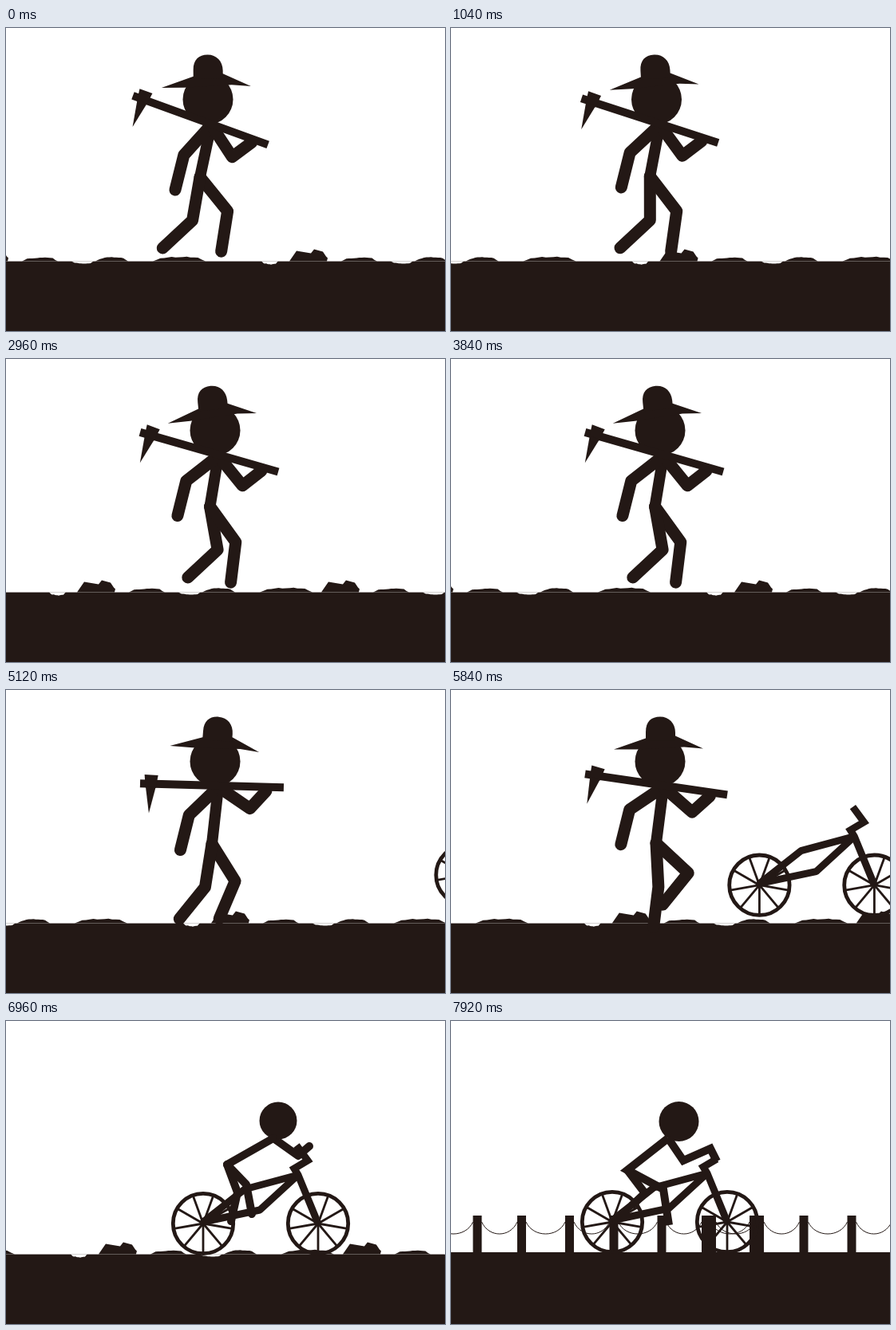
Recreate the animation shown at these times as an HTML page with a canvas. Size 550 by 380 pixels, loop 8000 ms.

```html
<!DOCTYPE html>
<html lang="en">
<head>
<meta charset="utf-8">
<title>Walker and rider</title>
<style>
html, body { margin: 0; width: 100%; height: 100%; overflow: hidden; background: #fff; }
canvas { display: block; width: 550px; height: 380px; }
</style>
</head>
<body>
<canvas id="stage" width="550" height="380"></canvas>
<script>
const ctx = document.getElementById('stage').getContext('2d');
const INK = '#231815';
const STEP = 80, FRAMES = 100;
const RESET = 48, MOUNT = 80, FENCE = 94;

const mix = (a, b, k) => a + (b - a) * k;
const mixAll = (a, b, k) => a.map((v, i) => mix(v, b[i], k));
const rad = deg => deg * Math.PI / 180;
const mod = (a, n) => (a % n + n) % n;
const noise = n => mod(Math.sin(n * 127.1 + 3) * 4375.5, 1);

function trace(pts) {
  ctx.beginPath();
  for (let i = 0; i < pts.length; i += 2) ctx.lineTo(pts[i], pts[i + 1]);
}
function shape(pts, color = INK) {
  trace(pts);
  ctx.fillStyle = color;
  ctx.fill();
}
function limb(pts, width, join = 'round') {
  trace(pts);
  ctx.lineWidth = width;
  ctx.lineJoin = join;
  ctx.lineCap = join === 'round' ? 'round' : 'butt';
  ctx.strokeStyle = INK;
  ctx.stroke();
}
function disc(x, y, r) {
  ctx.beginPath();
  ctx.arc(x, y, r, 0, 7);
  ctx.fillStyle = INK;
  ctx.fill();
}
function box(x, y, w, h, color = INK) {
  ctx.fillStyle = color;
  ctx.fillRect(x, y, w, h);
}
function placed(x, y, deg, draw) {
  ctx.save();
  ctx.translate(x, y);
  ctx.rotate(rad(deg));
  draw();
  ctx.restore();
}

// ---- Terrain: one tile of lumps (x, width, height), repeated ----
const TILES = [-400, 0, 306];
const LUMPS = [[65, 45, 5], [127, 28, -3], [157, 41, 5.5], [229, 66, 6]];

function lump(x, w, h) {
  const pts = [x, 0];
  for (let i = 1; i < 14; i++) {
    const t = i / 14;
    const edge = Math.min(1, 7 * t, 7 * (1 - t));
    const rise = .5 + .45 * Math.sin(Math.PI * t ** 1.3) + .2 * (noise(i + w) - .5);
    pts.push(x + w * t, -h * edge * rise);
  }
  shape([...pts, x + w, 0], h < 0 ? '#fff' : INK);
}
function rock() {
  shape([0, 0, 9, -13, 27, -10, 31, -15, 42, -12, 46, -6, 48, -4, 47, 0]);
}
function terrain(f) {
  const x = f < RESET ? 355 - 7.19 * f : 355 - 6.13 * (f - RESET);
  box(0, 292.6, 550, 88);
  placed(x, 292.6, 0, () => lump(-35, 21, -4));
  for (const tile of TILES) placed(x + tile, 292.6, 0, () => {
    rock();
    LUMPS.forEach(l => lump(...l));
  });
}

// ---- Walker ----
const STRIDE = 11;                    // frames per step
const KNOTS = [0, .18, .545, .818];   // landing, lift, swing, passing

// Value at step phase u, from four key values per step
function key(values, u) {
  const n = values.length / 4;
  u = mod(u, n);
  const at = i => KNOTS[i % 4] + (i >> 2);
  let i = values.length - 1;
  while (at(i) > u) i--;
  return mix(values[i], values[(i + 1) % values.length], (u - at(i)) / (at(i + 1) - at(i)));
}
// Point at a distance; angle counts from straight down, forwards positive
const reach = ([x, y], len, deg) => [x + len * Math.sin(rad(deg)), y + len * Math.cos(rad(deg))];

function chainOf(start, len1, deg1, len2, deg2) {
  const mid = reach(start, len1, deg1);
  return [...start, ...mid, ...reach(mid, len2, deg2)];
}
// Joint between two points, bent downwards
function elbow([ax, ay], [bx, by], l1, l2) {
  const d = Math.min(Math.hypot(bx - ax, by - ay), l1 + l2);
  const bend = Math.acos((l1 * l1 + d * d - l2 * l2) / (2 * l1 * d));
  const a = Math.atan2(by - ay, bx - ax) + bend;
  return [ax + l1 * Math.cos(a), ay + l1 * Math.sin(a)];
}

function hat() {
  shape([-58, -15, -18, -29, 19, -32, 54, -16, 30, -18, -30, -15]);
  ctx.fill(new Path2D('M-18-26V-37C-18-50-11-56 0-56S19-48 19-36V-26Z'));
}
function pick(tilt) {
  box(0, -5, 180, 10);
  placed(13, 0, Math.min(20, 2 * tilt) - tilt, () => {
    shape([-8, -11, 9, -11, 7, 5, -6, 5]);
    shape([-6, 3, 7, 3, 0, 37]);
  });
}
function walker(f) {
  const u = (f - 64) / STRIDE;
  const neck = [266, 121.5];
  const hip = [key([258, 252, 255.5, 257], u), key([193, 187, 185, 192], u)];
  const tilt = key([1.6, 20, 16, 8.3], u);
  const pickY = 120 - 1.76 * tilt;
  const a = rad(tilt);
  const hand = [168 + 158 * Math.cos(a), pickY + 158 * Math.sin(a) + 5];
  ctx.save();
  ctx.translate(-9 * Math.max(0, 1 - f / 26), 0);
  limb([...neck, ...hip], 14);
  limb(chainOf(neck, 51, key([-46, -42, -52, -56], u), 45, -14), 15);
  limb([...neck, ...elbow(neck, hand, 48, 30), ...hand], 15);
  for (const v of [u, u + 1]) {
    const thigh = key([32, 39, 36, 3, -9, -10, 10, 47], v);
    const shin = key([-23, -9, -7, -7, -39, -47, -47, -39], v);
    limb(chainOf(hip, 55, thigh, 51, shin), 15);
  }
  disc(262, 89.5, 31.5);
  placed(262, 89.5, key([4.6, -.5, -6, 0], u), hat);
  placed(168, pickY, tilt, () => pick(tilt));
  ctx.restore();
}

// ---- Bike and rider ----
function wheel(x) {
  ctx.beginPath();
  ctx.arc(x, 0, 37.7, 0, 7);
  ctx.strokeStyle = INK;
  ctx.lineWidth = 4.8;
  ctx.stroke();
  for (let i = 0; i < 9; i++) {
    const [ex, ey] = reach([x, 0], 37, 40 * i);
    limb([x, 0, ex, ey], 2.8, 'miter');
  }
}
function bike(grip) {
  const head = [119, -61], bar = [131, -79];
  wheel(0);
  wheel(144);
  disc(0, -1, 4.5);
  limb([0, -2, 52, -43, ...head, 71, -17, 0, -2], 9, 'bevel');
  limb([144, 0, ...head, 114, -69, ...bar, ...grip], 9, 'miter');
}

const easy = {
  head: [94, -129, 23.5], hip: [30, -74], back: [88, -107], arm: [119, -85, 133, -97],
  legs: [[43, -39, 35, -3], [54, -49, 61, -12]], grip: [117, -98], join: 'round', since: 87
};
const racing = {
  head: [83.5, -126, 25], hip: [19, -65], back: [70, -105], arm: [89, -77, 123, -92, 131, -76],
  legs: [[64, -41, 71, 4], [41, -36, 24, -20]], grip: [], join: 'miter', since: 99
};
function rider(r, f) {
  const k = (1 - Math.cos(Math.PI * (f - r.since) / 6)) / 2;
  const [a, b] = r.legs;
  disc(...r.head);
  limb([...r.back, ...r.arm], 10, r.join);
  limb([...r.back, ...r.hip, ...mixAll(a, b, k)], 10, r.join);
  limb([...r.hip, ...mixAll(b, a, k)], 10, r.join);
}

// ---- Fence: posts in pairs with hanging chains ----
function fence(start, posts) {
  for (let i = 0; i < posts; i++) {
    const x = start + 115.5 * (i >> 1) + 60 * (i % 2);
    const gap = i % 2 ? 55.5 : 60;
    box(x, 244, 11, 48);
    if (i === posts - 1) break;
    ctx.beginPath();
    ctx.moveTo(x + 11, 252);
    ctx.bezierCurveTo(x + 20, 272, x + gap - 9, 272, x + gap, 252);
    ctx.strokeStyle = INK;
    ctx.lineWidth = 1;
    ctx.stroke();
  }
}

function draw(f) {
  box(0, 0, 550, 380, '#fff');
  if (f >= FENCE) {
    const dx = 10 * (99 - f);
    box(0, 290, 550, 90);
    fence(dx - 148, 10);
    fence(dx + 321, 6);
    placed(202, 252, 0, () => { bike(racing.grip); rider(racing, f); });
    return;
  }
  terrain(f);
  if (f < MOUNT) walker(f);
  const k = Math.min(1, (f - 64) / 15.6);
  placed(mix(576.5, 247, k), mix(232, 254, k), 0, () => {
    bike(easy.grip);
    if (f >= MOUNT) rider(easy, f);
  });
}

const start = performance.now();
function tick(now) {
  draw(Math.floor(Math.max(0, now - start) / STEP) % FRAMES);
  requestAnimationFrame(tick);
}
draw(0);
requestAnimationFrame(tick);
</script>
</body>
</html>
```
